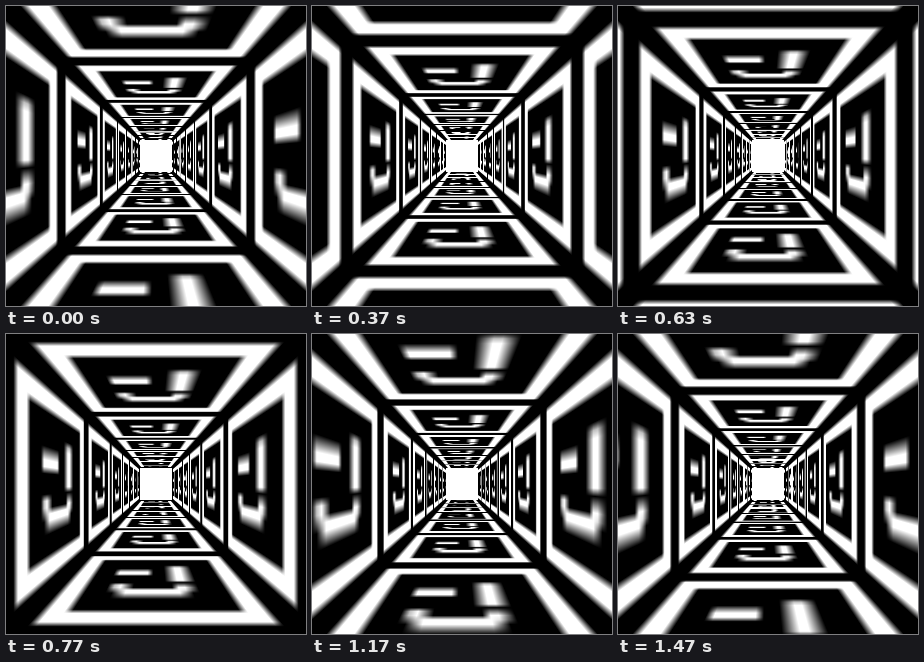
An HTML page with a canvas that plays this animation: 300x300 px, repeating every 1.51 s.

```html
<!DOCTYPE html>
<html lang="en">
<head>
<meta charset="utf-8">
<title>Tunnel</title>
<style>
  html, body { margin: 0; width: 100%; height: 100%; overflow: hidden; background: #000; }
  canvas { display: block; width: 300px; height: 300px; }
</style>
</head>
<body>
<canvas id="stage" width="300" height="300"></canvas>
<script>
const SIZE = 300, HALF = SIZE / 2;
const LOOP = 1510, STEPS = 45;
const FOCAL = HALF / Math.tan(Math.PI / 6) / 2; // 60° lens, walls half a tile from the axis
const DEPTH = 8;        // tiles until the open end
const PHASE = 0.375;
const TEX = 32;

// One wall tile: a frame and a face, as [x, y, w, h, shade]
const SHAPES = [
  [2, 2, 28, 28, '#fff'],
  [5, 5, 22, 22, '#000'],
  [9, 11.5, 6, 2.5, '#fff'],
  [18.5, 9.25, 3, 7.75, '#fff'],
  [9.25, 18, 2.25, 2.5, '#fff'],
  [10.5, 20, 10, 2.5, '#fff'],
  [19, 18.5, 2.5, 2.25, '#fff']
];

function makeTile() {
  const c = document.createElement('canvas');
  c.width = c.height = TEX;
  const g = c.getContext('2d');
  g.fillRect(0, 0, TEX, TEX);
  for (const [x, y, w, h, shade] of SHAPES) {
    g.fillStyle = shade;
    g.fillRect(x, y, w, h);
  }
  const rgba = g.getImageData(0, 0, TEX, TEX).data;
  return Float32Array.from({ length: TEX * TEX }, (_, i) => rgba[i * 4]);
}

const tile = makeTile();

// Bilinear lookup that wraps at the tile edges
function sample(u, v) {
  const x = u * TEX - 0.5, y = v * TEX - 0.5;
  const x0 = Math.floor(x), y0 = Math.floor(y);
  const fx = x - x0, fy = y - y0, m = TEX - 1;
  const a = x0 & m, b = (x0 + 1) & m;
  const p = (y0 & m) * TEX, q = ((y0 + 1) & m) * TEX;
  const top = tile[p + a] * (1 - fx) + tile[p + b] * fx;
  const low = tile[q + a] * (1 - fx) + tile[q + b] * fx;
  return top * (1 - fy) + low * fy;
}

const ctx = document.getElementById('stage').getContext('2d');
const image = ctx.createImageData(SIZE, SIZE);
const pixels = new Uint32Array(image.data.buffer);

function draw(shift) {
  let i = 0;
  for (let y = 0; y < SIZE; y++) {
    const dy = y + 0.5 - HALF;
    for (let x = 0; x < SIZE; x++) {
      const dx = x + 0.5 - HALF;
      const ax = Math.abs(dx), ay = Math.abs(dy), r = Math.max(ax, ay);
      const z = FOCAL / r;
      let shade = 255;
      if (z < DEPTH) {
        const d = z + shift - PHASE;
        const along = d - Math.floor(d);
        shade = ay > ax
          ? sample(0.5 + dx / (2 * r), dy < 0 ? along : 1 - along)
          : sample(dx < 0 ? along : 1 - along, 0.5 + dy / (2 * r));
      }
      pixels[i++] = 0xff000000 | (Math.round(shade) * 0x010101);
    }
  }
  ctx.putImageData(image, 0, 0);
}

// Thirty steps a second, with times rounded to 10 ms
function stepAt(t) {
  return Math.min(STEPS - 1, Math.floor((Math.floor(t / 10) + 0.5) * 0.3));
}

let shown = -1;
function tick() {
  const step = stepAt(performance.now() % LOOP);
  if (step !== shown) {
    shown = step;
    draw(step / STEPS);
  }
  requestAnimationFrame(tick);
}
tick();
</script>
</body>
</html>
```
